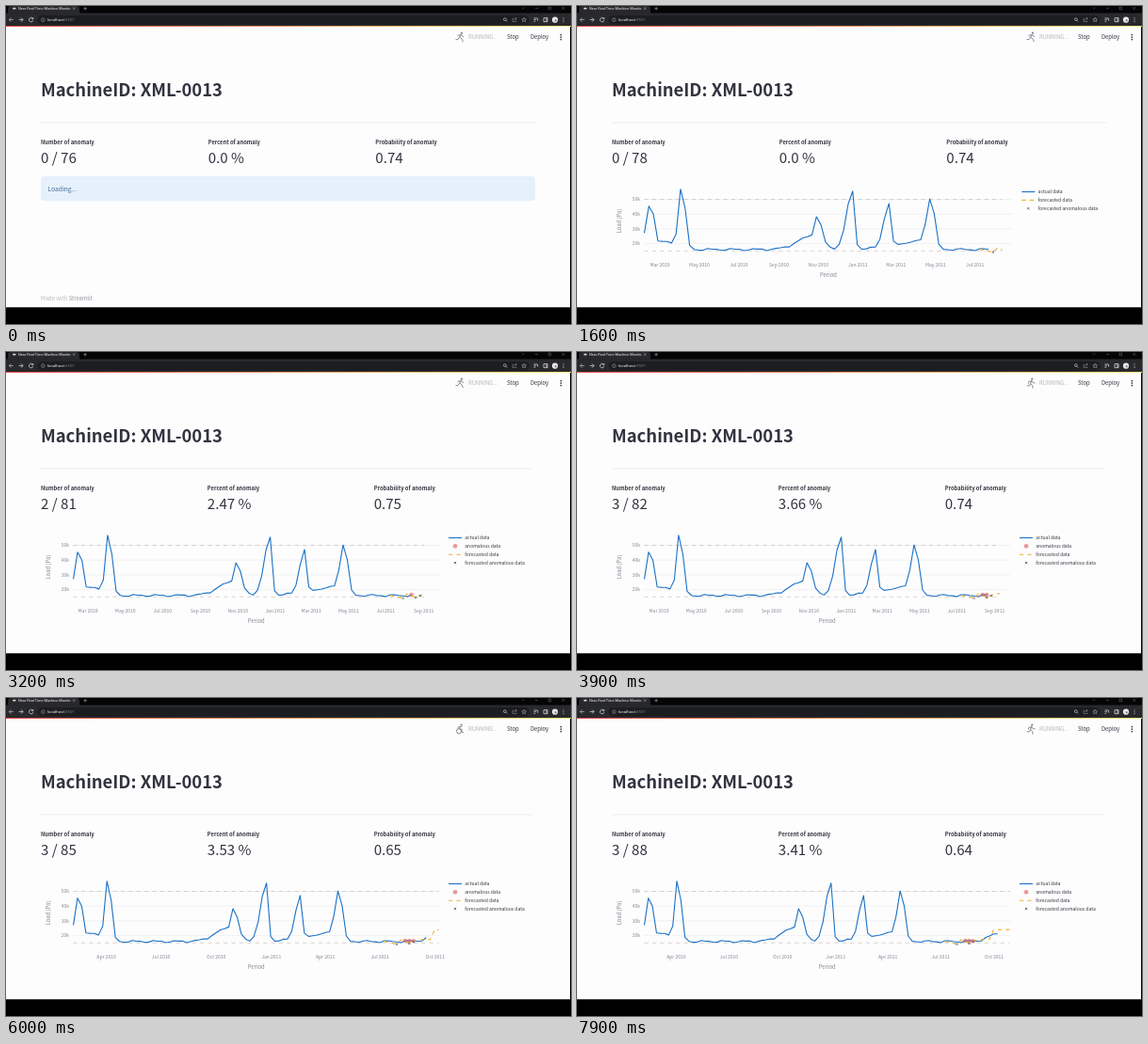
Recreate the animation shown at these times as an HTML page with a canvas. Size 600x338 px, loop 8 s.

```html
<!DOCTYPE html>
<html lang="en">
<head>
<meta charset="utf-8">
<title>Machine monitor</title>
<style>
  html, body { margin: 0; width: 100%; height: 100%; overflow: hidden; background: #000; }
  canvas { display: block; width: 600px; height: 338px; }
</style>
</head>
<body>
<canvas id="stage"></canvas>
<script>
const canvas = document.getElementById('stage');
const ctx = canvas.getContext('2d');
const ratio = window.devicePixelRatio || 1;
canvas.width = 600 * ratio;
canvas.height = 338 * ratio;

const LOOP = 8000, LEFT = 71.5;
const INK = '#31333f', MUTED = '#858896', BLUE = '#1a70c6', ORANGE = '#f0b02e';
const UI = '"Noto Sans CJK JP", "Noto Sans CJK SC", Lato, sans-serif';
const BROWSER = 'Roboto, "Open Sans", sans-serif';
const DASH = [4.2, 4.2];

// Hills of the weekly load: centre, height, rise and fall in weeks.
const hills = [
  [1.4, 48, 1.3, 1], [5, 8, 4, 2.5], [8.3, 69, 1, 1],
  [37, 14, 4.5, 3], [38.35, 26, 0.9, 1], [46, 62, 1.9, 0.65],
  [54, 45, 1.6, 0.6], [60, 8, 7, 3.5], [63.35, 54, 1.4, 1], [87.5, 9, 3.5, 3]
];
// Corners of the forecast: week, height on the stage.
const corners = [[74, 258.6], [77, 261.6], [78, 257], [80, 261], [82, 257], [85, 256.6], [86, 246.5], [90, 246]];
const alarms = [77, 80, 81];

// Status figures: head x, head y, limbs.
const poses = [
  [7.5, 1.6, 'M7 3.4L5 6.3L7.6 8.2L9 11.4M5 6.3L3.4 9L1 9.2M6.6 3.8L3 4.4M7 4L9.4 6'],
  [7.8, 3.2, 'M6.6 5L3.5 7L6 8.4L9 8M6.5 5L9.5 6.5M.5 9.5Q3 11.5 5.5 9.8T10.5 9.8'],
  [5.3, 1.4, 'M.8 3.9H9.8M4.5 4V12M6.1 4V12M5.3 4V7.5'],
  [7, 1.6, 'M6.4 3.4L4.2 5.6L6 7.2V9.6M6.4 3.6L8.8 5.2M4.9 9.3A2 2 0 1 1 .9 9.3A2 2 0 1 1 4.9 9.3M10.7 9.3A2 2 0 1 1 6.7 9.3A2 2 0 1 1 10.7 9.3'],
  [7.2, 1.6, 'M6.6 3.4L4.6 5.7L7.8 6.8L7.4 9.6L9.4 10.2M6.6 3.6L4 3.8L2.8 5.4M7.2 8.8A2.8 2.8 0 1 1 1.6 8.8A2.8 2.8 0 1 1 7.2 8.8'],
  [6.6, 1.6, 'M6 3.4L4 6.4L6.4 8L5 11M6 3.8L9 5.4M9 4.4L10.4 10.6M.6 9.4L9.6 12'],
  [6.8, 1.6, 'M6.2 3.4L5.2 7L7 9V12M5.2 7L3.8 9.2L1.2 10M6.2 4L3.4 5L3 7M6.2 4L8 6L9.6 5.4'],
  [6.8, 1.6, 'M6.3 3.4L5 7L7.3 9L7.6 12M5 7L3.8 9.5L1.2 9.3M6.2 3.8L3 4.6L2.5 6.6M6.4 4L8 6L10 6.2']
].map(([x, y, d]) => [x, y, new Path2D(d)]);

const hill = (x, [centre, height, rise, fall]) =>
  height * Math.exp(-(((x - centre) / (x < centre ? rise : fall)) ** 2));

const loadAt = week =>
  hills.reduce((y, h) => y - hill(week, h), 258.8) + 0.9 * Math.sin(week * 1.25 - 1) + 0.5 * Math.sin(week * 2.6);

function forecastAt(week) {
  const i = corners.findIndex(([w]) => w >= week);
  const [w1, y1] = corners[i], [w0, y0] = corners[Math.max(0, i - 1)];
  return w1 === week ? y1 : y0 + (y1 - y0) * (week - w0) / (w1 - w0);
}

// Samples arrive faster until the first anomaly at 2600 ms.
const countAt = t => Math.max(76, 80 + Math.floor((t - 2600) / (t < 2600 ? 500 : 600)));
const anomalies = count => Math.min(3, Math.max(0, count - 79));
const chance = count =>
  (count < 83 ? 0.74 : 0.64) + hill(count, [80, 0.02, 1, 1]) + hill(count, [85, 0.01, 0.6, 0.6]);

function text(str, x, y, size, color, weight = 400, align = 'left', family = UI) {
  ctx.font = `${weight} ${size}px ${family}`;
  ctx.textAlign = align;
  ctx.textBaseline = 'alphabetic';
  ctx.fillStyle = color;
  ctx.fillText(str, x, y);
  return x + ctx.measureText(str).width;
}

function rect(x, y, w, h, color, radius = 0) {
  ctx.fillStyle = color;
  ctx.beginPath();
  ctx.roundRect(x, y, w, h, radius);
  ctx.fill();
}

function dot(x, y, r, color) {
  ctx.fillStyle = color;
  ctx.beginPath();
  ctx.arc(x, y, r, 0, Math.PI * 2);
  ctx.fill();
}

function line(points, color, width, dash = []) {
  ctx.strokeStyle = color;
  ctx.lineWidth = width;
  ctx.setLineDash(dash);
  ctx.beginPath();
  points.forEach(([x, y]) => ctx.lineTo(x, y));
  ctx.stroke();
  ctx.setLineDash([]);
}

function icon(d, color = '#c4c6c9', width = 0.7) {
  ctx.strokeStyle = color;
  ctx.lineWidth = width;
  ctx.stroke(new Path2D(d));
}

function cross(x, y) {
  line([[x - 1.1, y - 1.1], [x + 1.1, y + 1.1]], '#66686f', 0.9);
  line([[x - 1.1, y + 1.1], [x + 1.1, y - 1.1]], '#66686f', 0.9);
}

function drawBrowser() {
  rect(0, 0, 600, 8, '#050506');
  rect(2, 0, 76, 8, '#28292c', [3, 3, 0, 0]);
  rect(0, 7.5, 600, 13.7, '#28292c');
  rect(7, 1.8, 3.6, 1.6, '#d8d8d8', 0.8);
  text('Near Real-Time Machine Monito', 13, 4.1, 3.9, '#f0f0f2', 400, 'left', BROWSER);
  icon('M71 1.4l2.4 2.4M73.4 1.4l-2.4 2.4M82.3 2.7h3.6M84.1 .9v3.6', '#c4c6c9', 0.5);
  icon('M548 1.6l1.2 1.2l1.2-1.2M562 2.4h3M576 1.1h2.6v2.6h-2.6zM590.5 1.1l2.6 2.6M593.1 1.1l-2.6 2.6', '#77787b', 0.5);
  rect(33.5, 10, 522, 9.6, '#1c1d20', 4.8);
  icon('M7.8 14.6H3.4M5.4 12.5L3.3 14.6L5.4 16.7');
  icon('M13.6 14.6H18M16 12.5L18.1 14.6L16 16.7', '#e4e5e8');
  icon('M28.4 13.3A2.2 2.2 0 1 0 28.8 15.2M28.8 12v1.7h-1.7', '#e4e5e8');
  icon('M41.2 14.7A1.9 1.9 0 1 1 37.4 14.7A1.9 1.9 0 1 1 41.2 14.7M39.3 14.3v1.5M39.3 13.3v.5', '#a4a6aa', 0.5);
  const end = text('localhost', 44, 16.4, 4.4, '#f0f0f2', 400, 'left', BROWSER);
  text(':8501', end, 16.4, 4.4, '#75777c', 400, 'left', BROWSER);
  icon('M531.2 14.2A1.4 1.4 0 1 1 528.4 14.2A1.4 1.4 0 1 1 531.2 14.2M530.9 15.2l1.5 1.5');
  icon('M539 13.4h-1v3.2h4v-1M539.6 15q.2-1.8 2.4-1.8M541 12l1.3 1.2l-1.3 1.2', '#a4a6aa', 0.5);
  icon('M550.2 12.3l.7 1.6l1.7.1l-1.3 1.1l.4 1.7l-1.5-.9l-1.5.9l.4-1.7l-1.3-1.1l1.7-.1z', '#c4c6c9', 0.5);
  icon('M560.5 13h3.6M560.5 14.7h2.4M560.5 16.4h1.6M564.6 13v2.8', '#e4e5e8');
  icon('M571 12.7h4v4h-4zM574 12.7v4', '#f0f0f2');
  dot(583, 14.7, 3.1, '#e6e6e6');
  dot(583.7, 15.3, 1.1, '#77787b');
  [12.8, 14.7, 16.6].forEach(y => dot(592, y, 0.55, '#c4c6c9'));
}

function drawHeader(t) {
  const glow = ctx.createLinearGradient(0, 0, 600, 0);
  glow.addColorStop(0, '#e04a48');
  glow.addColorStop(1, '#ece47c');
  rect(0, 21.1, 600, 1, glow);
  const [hx, hy, limbs] = poses[Math.floor(t / 100) % poses.length];
  ctx.save();
  ctx.translate(477, 27.2);
  ctx.scale(0.92, 0.92);
  ctx.lineCap = ctx.lineJoin = 'round';
  dot(hx, hy, 1.2, '#858791');
  ctx.strokeStyle = '#858791';
  ctx.lineWidth = 1.05;
  ctx.stroke(limbs);
  ctx.restore();
  text('RUNNING...', 491, 35.2, 5.87, '#b3b4ba');
  text('Stop', 532, 35.4, 5.87, INK);
  text('Deploy', 557, 35.4, 5.87, INK);
  [30.6, 33.1, 35.6].forEach(y => dot(589.3, y, 0.85, INK));
}

function drawMetrics(count, width) {
  const bad = anomalies(count);
  const share = bad ? (bad / count * 100).toFixed(2) : '0.0';
  const column = (width + 8) / 3;
  text('MachineID: XML-0013', 37, 96, 18.45, INK, 700);
  line([[37, 124], [37 + width, 124]], '#e4e5e8', 0.7);
  [
    ['Number of anomaly', `${bad} / ${count}`],
    ['Percent of anomaly', `${share} %`],
    ['Probability of anomaly', chance(count).toFixed(2)]
  ].forEach(([label, value], i) => {
    const x = 37 + i * column;
    text(label, x, 146.5, 5.8, INK, 600);
    text(value, x, 167, 15.1, INK);
  });
}

function drawLegend(x, hasAnomalies) {
  const rows = [['actual data', y => line([[x, y], [x + 14, y]], BLUE, 1.1)]];
  if (hasAnomalies) rows.push(['anomalous data', y => dot(x + 7, y, 2.4, '#e99a98')]);
  rows.push(['forecasted data', y => line([[x, y], [x + 14, y]], ORANGE, 1.1, DASH)]);
  rows.push(['forecasted anomalous data', y => cross(x + 7, y)]);
  rows.forEach(([label, mark], i) => {
    const y = 197.5 + i * 8.85;
    mark(y);
    text(label, x + 17.3, y + 1.9, 5.03, INK);
  });
}

function drawChart(count, right) {
  const shown = alarms.filter(i => i <= count + 1);
  const span = Math.max(shown[shown.length - 1] * 1.055, count + 2.1);
  const px = week => LEFT + week * (right - LEFT) / span;
  const curve = (from, to, f) =>
    Array.from({ length: to - from + 1 }, (_, i) => [px(from + i), f(from + i)]);

  for (let k = 20; k <= 50; k += 10) {
    const y = 283.8 - k * 1.566;
    line([[LEFT, y], [right, y]], '#e8e9ed', 0.6);
    text(k + 'k', 67, y + 1.9, 5.03, MUTED, 400, 'right');
  }
  [205.5, 260.3].forEach(y => line([[LEFT, y], [px(count + 2), y]], '#cdc0be', 0.7, DASH));

  const start = Date.UTC(2010, 1, 5), step = span < 87 ? 2 : 3;
  for (let m = step; ; m += step) {
    const date = new Date(Date.UTC(2010, m));
    const x = px((date - start) / 6048e5);
    if (x > right) break;
    const month = date.toLocaleString('en-US', { month: 'short', timeZone: 'UTC' });
    text(`${month} ${date.getUTCFullYear()}`, x, 277.1, 5.03, MUTED, 400, 'center');
  }
  text('Period', (LEFT + right) / 2, 288.4, 5.87, MUTED, 400, 'center');
  ctx.save();
  ctx.translate(47, 228.5);
  ctx.rotate(-Math.PI / 2);
  text('Load [Pa]', 0, 0, 5.87, MUTED, 400, 'center');
  ctx.restore();

  ctx.lineJoin = 'round';
  line(curve(0, count - 1, loadAt), BLUE, 1.1);
  const bad = anomalies(count);
  for (let i = 79; i < 79 + bad; i++) dot(px(i), loadAt(i), 2.3, 'rgba(222, 90, 88, .6)');
  line(curve(corners[0][0], count + 2, forecastAt), ORANGE, 1.1, DASH);
  shown.forEach(i => cross(px(i), forecastAt(i)));
  drawLegend(right + 10, bad > 0);
}

function draw(t) {
  ctx.setTransform(ratio, 0, 0, ratio, 0, 0);
  rect(0, 0, 600, 338, '#000');
  rect(0, 20, 599, 300.3, '#fdfdfd');
  drawBrowser();
  drawHeader(t);
  const count = countAt(t);
  const narrow = count >= 80;
  drawMetrics(count, narrow ? 522.5 : 525);
  if (t >= 800) {
    drawChart(countAt(t - 300), narrow ? 460 : 462.3);
  } else {
    rect(37, 181, 525, 26.3, '#e6f0fa', 4);
    text('Loading...', 44.5, 196.7, 6.7, '#3d6d99');
    const end = text('Made with ', 37, 313, 5.87, '#b9bac0');
    text('Streamlit', end, 313, 5.87, '#92949d');
  }
}

function tick(now) {
  draw(now % LOOP);
  requestAnimationFrame(tick);
}
draw(0);
requestAnimationFrame(tick);
</script>
</body>
</html>
```
